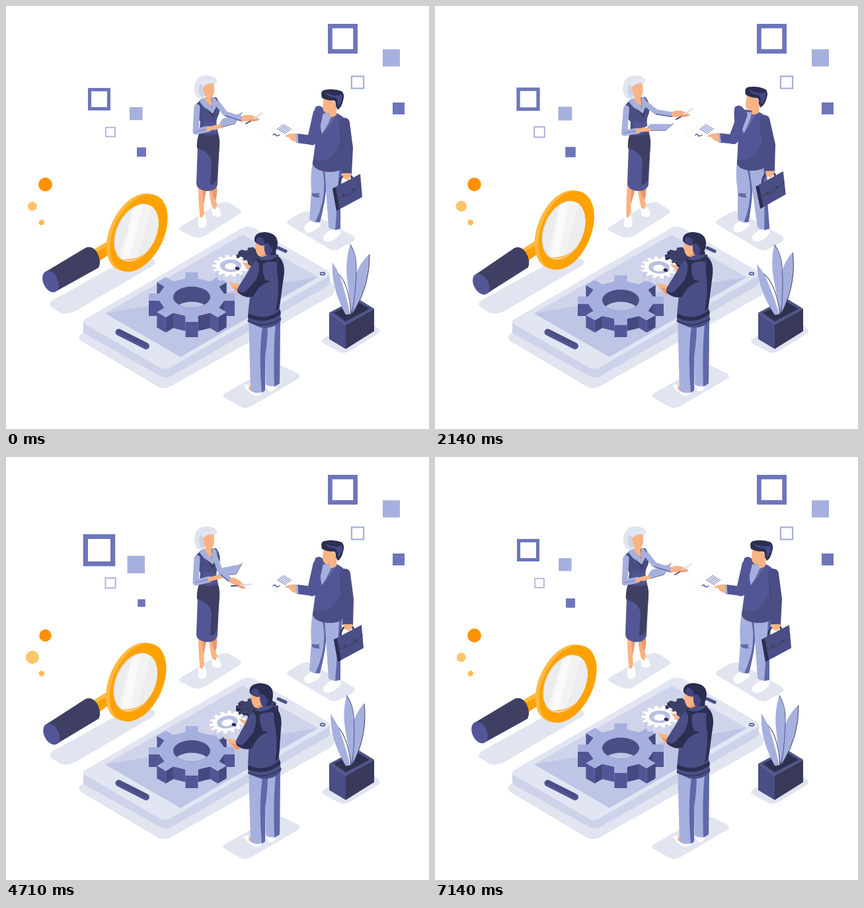
Animation of 640 by 640 pixels, one loop 7.21 s. Source, as an HTML page:

```html
<!DOCTYPE html>
<html lang="en">
<head>
<meta charset="utf-8">
<title>Isometric team</title>
<style>
html, body { margin: 0; height: 100%; overflow: hidden; background: #fff; }
svg { display: block; width: 100%; height: 100%; }
</style>
</head>
<body>
<svg viewBox="0 0 640 640"><g id="base"></g><g id="live"></g></svg>
<script>
const LOOP = 7210, STEP = LOOP / 101;
const NAVY = '#3e3f62', BLUE = '#525696', MID = '#4a4e85', LIGHT = '#a6b0de', SHADE = '#5f68a8',
  INK = '#2b2e50', SKIN = '#f9b384', SKIN2 = '#e9996c', SHADOW = '#e1e5f0', VIOLET = '#6d76ba',
  SCREEN = '#bec5e5';
let now = 0;

// SVG helpers
const shape = (fill, d, more = '') => `<path fill="${fill}" d="${d}" ${more}/>`;
const poly = (fill, points, more) => shape(fill, `M${points}Z`, more);
const line = (color, width, d, cap = 'round') =>
  `<path fill="none" stroke="${color}" stroke-width="${width}" stroke-linejoin="round" stroke-linecap="${cap}" d="${d}"/>`;
const oval = (fill, x, y, rx, ry, turn = 0) =>
  `<ellipse fill="${fill}" cx="${x}" cy="${y}" rx="${rx}" ry="${ry}" transform="rotate(${turn} ${x} ${y})"/>`;
const group = (transform, ...parts) => `<g transform="${transform}">${parts.join('')}</g>`;
const clipped = (id, outline, ...parts) =>
  `<clipPath id="${id}">${outline}</clipPath><g clip-path="url(#${id})">${parts.join('')}</g>`;

// Eased, looping interpolation between values at given times
function track(times, values) {
  let i = times.length - 1;
  while (times[i] > now) i--;
  const end = times[i + 1] ?? LOOP, next = values[(i + 1) % values.length];
  const u = Math.min(1, (now - times[i]) / (end - times[i]));
  return values[i] + (next - values[i]) * u * u * (3 - 2 * u);
}
const POSES = [0, 1430, 2860, 3930, 4710, 5570];
const key = (...values) => track([...POSES, 7140], [...values, values[0]]);
const morph = (...poses) => {
  const rows = poses.map(p => p.split(' ').map(Number));
  return rows[0].map((_, i) => key(...rows.map(r => r[i])).toFixed(2));
};

// Extruded cog seen from above
function cog(x, y, outer, inner, teeth, half, squash, depth, faces, top) {
  const points = [];
  for (let k = 0; k < teeth; k++) {
    const a = k * 2 * Math.PI / teeth, c = Math.cos(a), s = Math.sin(a);
    for (const [u, v] of [[inner, -half], [outer, -half], [outer, half], [inner, half]])
      points.push([x + u * c - v * s, y + (u * s + v * c) * squash]);
  }
  const sides = points.map((p, i) => [p, points[(i + 1) % points.length]])
    .filter(([p, q]) => q[0] < p[0] - .01)
    .sort((a, b) => a[0][1] + a[1][1] - b[0][1] - b[1][1])
    .map(([p, q]) => poly(faces[q[1] - p[1] > 1 ? 1 : 0], [p, q, [q[0], q[1] + depth], [p[0], p[1] + depth]]));
  return sides.join('') + poly(top, points);
}

function backdrop() {
  return [
    shape(SHADOW, 'M264 334L322 299Q330 295 338 298L354 308Q358 312 353 315L300 348Q291 353 282 349L264 340Q260 337 264 334Z'),
    shape(SHADOW, 'M427 324L446 313Q453 309 460 312L524 347Q531 352 524 357L503 368Q497 371 490 368L428 331Q423 328 427 324Z'),
    shape(SHADOW, 'M69 446L192 378Q212 379 224 384Q228 389 222 393L106 461Q92 468 82 464L68 455Q64 451 69 446Z'),
    shape(SHADOW, 'M112 498L130 480L480 400L497 425Q498 436 490 440L250 575Q240 581 230 576L114 507Q108 502 112 498Z'),
    shape(SHADOW, 'M331 586L402 546Q410 541 419 545L442 556Q448 560 442 564L372 605Q363 611 354 606L331 593Q326 590 331 586Z'),
    shape(SHADOW, 'M481 503L530 474Q540 469 548 474L563 488Q568 493 561 497L520 522Q512 527 504 523L481 511Q475 507 481 503Z'),
    // phone
    shape('#cfd3ea', 'M117 478V492Q117 495 121 497L232 559Q241 565 250 560L486 424Q490 421 490 417V404Z'),
    shape('#e2e6f3', 'M121 473L357 336Q366 331 376 336L486 400Q494 405 486 410L250 546Q241 552 231 546L121 482Q113 477 121 473Z'),
    poly('#d0d4eb', '150 465 358 346 472 410 264 531'),
    poly(SCREEN, '150 465 472 410 264 531'),
    line(BLUE, 10, 'M170.500 493.500L212 514.500'), line(MID, 6, 'M171 492L211 512'),
    line(MID, 5, 'M412 366L423 371'),
    `<ellipse cx="479" cy="405" rx="3.6" ry="2" fill="#c5cbe6" stroke="${MID}" stroke-width="1.3"/>`
  ].join('');
}

// The large cog rises from the screen and sinks back
function machinery() {
  const depth = key(23, 16, 21, 23, 19, 16), y = 463.5 - depth;
  return cog(281, y, 65, 49, 8, 9.5, .577, depth, [BLUE, '#454980'], LIGHT)
    + oval(MID, 281, y, 28, 16)
    + clipped('hole', `<ellipse cx="281" cy="${y}" rx="28" ry="16"/>`, oval(SCREEN, 281, y + depth, 28, 16))
    + cog(380, 378, 32, 25, 10, 4.5, .42, 5, [INK, INK], '#3c4068');
}

// Decorations
const bump = (center, half) => {
  const d = Math.abs(now % (LOOP / 3) - center) / half;
  return d < 1 ? Math.cos(d * Math.PI / 2) ** 2 : 0;
};
const pulse = (size, gain, center) => size + gain * (bump(center, 400) - .28 * bump(center + 500, 250));
const box = (x, y, size, color) =>
  `<rect x="${x - size / 2}" y="${y - size / 2}" width="${size}" height="${size}" fill="${color}"/>`;
const frame = (x, y, size, color, weight) =>
  box(x, y, size, color) + box(x, y, size * (1 - 2 * weight), '#fff');

const decorations = () => [
  frame(509.5, 49.5, pulse(45, 20, 1110), VIOLET, .15),
  box(583, 78.5, pulse(26, 11, 950), LIGHT),
  frame(532, 115.5, pulse(20.5, 9.5, 680), LIGHT, .11),
  box(594, 155, pulse(18, 9, 600), VIOLET),
  frame(141, 141, key(34, 37, 33.5, 33, 48.5, 30.5), VIOLET, .15),
  box(196.8, 162.8, key(19.5, 25, 16.5, 20, 26.5, 16), LIGHT),
  frame(158, 190.7, key(15.5, 22, 13, 21, 17, 13.5), LIGHT, .11),
  box(205, 221, key(14, 18, 13, 19, 11.5, 14), VIOLET),
  ...[['#ff9100', 59.5, 270, key(10.4, 10, 10.4, 14.6, 9.2, 10.2)],
    ['#ffc56b', 39.8, 303, key(7, 10, 6.5, 7.2, 10, 5.8)],
    ['#ffb84d', 53.8, 327.6, key(4.2, 4.2, 4, 4.2, 4.2, 5.8)]].map(([c, x, y, r]) => oval(c, x, y, r, r))
].join('');

function magnifier() {
  const turn = track([0, 550, 1430, 1900, 2860, 3930, 4710, 5570, 6400, 7140],
    [0, 4.8, -4.6, -5, 4.8, -3.6, -2, 4.8, -4.8, 0]);
  return group(`rotate(${turn} 132 382)`,
    poly('#ffb93f', '133 368 157 354 160 362 138 376'),
    poly('#ffa200', '135 373 159 360 165 370 141 386'),
    shape(NAVY, 'M60 402L121 365.500Q131 362 138 373Q145 387 140 396L75 432Z'),
    oval(BLUE, 67.5, 417, 11, 17, -25),
    oval('#ffb93f', 195.5, 342, 37.8, 62.5, 26),
    oval('#ffa200', 201, 343.5, 37.8, 62.5, 26),
    oval('#d9dbe0', 197, 343, 30, 46.5, 26),
    clipped('lens', '<ellipse cx="198" cy="343" rx="29" ry="45.5" transform="rotate(26 198 343)"/>',
      box(198, 343, 120, '#f3f3f3'), poly('#ebecee', '152 330 182 295 196 295 166 395 152 395'),
      poly('#fafafa', '196 295 208 295 184 395 172 395'), poly('#ededef', '226 290 250 290 218 395 194 395')),
    shape('#ffb93f', 'M176 383Q195 391 214 371Q199 385 176 383Z'));
}

function woman() {
  const shift = key(0, 3, 3, 0, 0, 0), lean = key(0, -5, -1, 0, 0, 3.5);
  const arm = morph('318 145 332 163 357 171', '317 146 340 154 368 151', '317 147 329 167 350 178',
    '315 148 325 175 339 186', '315 148 325 175 339 186', '320 150 330 173 347 183');
  const sleeve = morph('289 153 287 190 306 186', '290 155 285 192 304 190', '289 155 288 192 309 188',
    '289 153 287 190 308 185', '289 153 287 190 308 185', '290 154 307 188 317 177');
  const tablet = morph('317 186 346 178 357 161 327 170', '312 190 348 191 359 183 322 181',
    '318 187 350 185 361 173 330 174', '319 180 348 177 357 161 327 167',
    '319 180 348 177 357 161 327 167', '327 170 348 153 351 132 329 156');
  return [
    group(`rotate(${key(0, 7, 3, 0, 0, 0)} 298 272)`,
      shape(SKIN, 'M291 270H304L299 300Q300 315 301 322L294 322Q291 300 291 270Z'),
      shape(SKIN2, 'M298 274H304L299 300Q297 288 298 274Z'),
      shape('#fff', 'M292 317Q296 325 300 314Q305 325 303 333Q297 338 291 334Q290 325 292 317Z')),
    shape(SKIN, 'M307 270H319Q320 285 317 294L323 309L316 313Q308 300 307 270Z'),
    shape(SKIN2, 'M310 274H319Q320 285 317 294Q312 288 310 274Z'),
    shape('#fff', 'M311 303Q317 312 319 302Q326 309 326 317Q320 321 312 317Z'),
    group(`translate(${shift} 0)`,
      shape(BLUE, 'M290 212L288 268Q288 278 304 280Q318 280 320 270L323 205Q306 198 290 212Z'),
      shape(NAVY, 'M293 190Q306 196 320 190Q324 200 323 212L319 262Q315 272 309 270L311 235Q308 220 289 215Q288 202 293 190Z'),
      group(`rotate(${lean} 306 192)`,
        shape(MID, 'M285 152Q294 139 306 139L318 138Q327 150 322 164Q317 172 319 182L321 193Q306 199 292 193L294 175Q286 165 285 152Z'),
        shape(BLUE, 'M300 172Q310 180 317 174L320 190Q308 196 296 190Z'),
        shape(LIGHT, 'M292 143Q300 136 304 142L312 154L312 137Q321 140 319 150L313 164Q300 156 292 143Z'),
        shape(NAVY, 'M301 153L313 163L317 155L314 170Z'),
        shape(SKIN, 'M300 138L311 137L312 152Q303 147 300 138Z'),
        shape('#e0e4ef', 'M285 123Q287 104 304 105Q320 106 319 115L300 138Q290 143 287 134Q284 128 285 123Z'),
        shape(SKIN, 'M298 123Q304 116 314 117Q317 128 313 136Q308 142 303 138Q297 130 298 123Z'),
        shape('#ccd2e3', 'M292 130Q290 114 306 110Q313 109 318 114Q312 113 309 118Q300 117 297 124Q302 130 299 138Q294 138 292 130Z'),
        shape('#e4e7f0', 'M294 117Q301 108 318 111L316 117Q305 115 298 122Z'))),
    line(LIGHT, 9, 'M' + sleeve), line('#8b95cb', 2, `M${sleeve[2]} ${sleeve[3]}L${sleeve[4]} ${sleeve[5]}`),
    line(SKIN, 6, `M${sleeve[4]} ${sleeve[5]}l12 -3`),
    poly('#fff', tablet, 'stroke="#eef0f7" stroke-width="2"'),
    poly(LIGHT, tablet, 'stroke="#fff" stroke-width="1.5"'),
    line(MID, 1, `M${tablet.slice(0, 2)}L${tablet.slice(2, 4)}L${tablet.slice(4, 6)}`),
    line(SKIN, 5, `M${+sleeve[4] + 9} ${sleeve[5] - 2}l9 ${key(-2, 2, -1, -2, -2, -12)}`),
    line(LIGHT, 8, 'M' + arm, 'butt'), line(SHADE, 1.5, `M${arm[2]} ${+arm[3] + 3}L${arm[4]} ${+arm[5] + 3}`),
    group(`translate(${arm.slice(4)}) rotate(${key(0, -8, 8, 28, 28, 12)})`,
      shape(SKIN, 'M-1 -4Q8 -8 17 -5L27 0Q24 4 14 3Q5 4 -1 3Z'),
      line('#d5d9ea', 2, 'M14 2L31 -9'), line(MID, 2, 'M6 7L15 2'), shape(SKIN2, 'M12 0L26 1Q20 4 13 3Z'))
  ].join('');
}

function visitor() {
  const hip = key(0, -7, -7, -3, 0, 0), slant = -hip / 95;
  const arm = morph('472 163 463 203 440 200', '465 162 456 201 438 202', '465 167 447 202 422 197',
    '470 163 461 202 438 197', '472 163 463 203 440 200', '472 163 463 203 440 200');
  const right = morph('512 177 517 215 515 254', '500 175 503 213 494 252', '497 171 511 207 518 249',
    '510 177 513 215 508 253', '513 177 518 215 517 254', '512 177 517 215 515 254');
  const lines = [0, 1, 2, 3, 4].map(i => line('#8c95c6', 1.3, `M${-21 - 2.2 * i} ${-21 + 1.6 * i}l13 8`, 'butt'));
  return [
    shape('#fff', 'M452 333Q460 322 472 326L477 330Q470 340 458 343Q449 341 452 333Z'),
    shape('#fff', 'M480 349Q490 334 505 338L507 343Q500 354 488 357Q478 356 480 349Z'),
    group(`matrix(1 0 ${slant} 1 ${-slant * 335} 0)`,
      shape(LIGHT, 'M464 236L488 240L482 295L475 327Q466 329 459 323L462 280Q460 258 464 236Z'),
      shape(SHADE, 'M478 244L487 248Q485 290 475 327L468 327Q488 285 478 244Z'),
      shape(LIGHT, 'M482 242L509 240L506 290V337Q496 341 488 335L485 290Z'),
      shape(SHADE, 'M504 246L509 240L506 290V337L498 339Q502 290 504 246Z'),
      shape(SHADE, 'M463 283Q469 284 475 283Q471 287 476 289Q468 291 463 287Z')),
    group(`translate(${key(0, -6, -7, -2, 0, 0)} ${key(0, -2, -2, 0, 0, 0)}) rotate(${key(0, -3, -7, 0, 0, 0)} 487 245)`,
      shape(BLUE, 'M468 153Q476 147 482 158L498 161Q516 168 519 184L511 238Q512 251 488 251Q466 249 464 238L469 200Q463 170 468 153Z'),
      shape(MID, 'M465 232Q490 240 502 212L514 200L511 238Q512 251 488 251Q466 249 464 238Z'),
      shape(LIGHT, 'M476 163Q486 161 498 164Q490 178 478 194Q474 180 476 163Z'),
      shape(SHADE, 'M493 163L499 164Q492 180 478 194Q490 176 493 163Z'),
      group(`translate(${key(0, 8, 0, 0, 0, 0)} ${key(0, -3, 0, 0, 0, 0)}) rotate(${key(0, 14, 4, 0, 0, 0)} 492 162)`,
        shape(SKIN, 'M481 139Q478 150 480 158Q484 164 489 162L490 168Q495 169 500 165L501 146Z'),
        shape(INK, 'M478 139Q475 128 482 127Q496 124 508 129Q513 134 510 143Q508 153 502 157L499 151Q500 142 494 143Q485 143 478 139Z'),
        shape('#434989', 'M483 131Q486 138 497 138Q503 140 502 153Q511 143 508 133Q501 139 483 131Z'))),
    line(MID, 16, 'M' + right, 'butt'), oval(MID, right[0], right[1], 8, 8),
    line(NAVY, 1, `M${right[0] - 7} ${+right[1] + 12}L${right[2] - 8} ${right[3]}`),
    group(`translate(${right[4]} ${+right[5] + 3}) rotate(${key(0, 7, -10, 4, 0, 0)})`,
      line(NAVY, 3, 'M-11 16Q-11 -1 2 -2Q10 -1 9 8'),
      shape(SKIN, 'M-6 -4L7 -4Q8 4 1 6L-5 3Z'),
      poly(MID, '-21 19 21 -3 24 32 -15 53'), poly(INK, '-21 19 -16 18 -10 50 -15 53'),
      line(NAVY, 1.2, 'M-18 35Q10 30 22 12'), line(NAVY, 4, 'M-4 27v4M11 19v4', 'butt')),
    line(BLUE, 15, 'M' + arm.slice(0, 4)), line(BLUE, 14, `M${arm.slice(2, 4)}L${arm.slice(4)}`, 'butt'),
    oval(BLUE, arm[2], arm[3], 7.4, 7.4),
    group(`translate(${arm.slice(4)}) rotate(${key(0, -10, 7, 0, 0, 0)})`,
      poly('#fff', '-51 -6 -26 -23 0 -11 -28 6', 'stroke="#eef0f7" stroke-width=".8"'),
      ...lines, line(MID, 1.4, 'M-36 -5q3 -3 4 0t6 0'),
      shape(SKIN, 'M1 -7Q-7 -8 -16 -5L-18 -2Q-12 -3 -10 1Q-6 6 1 6Z'),
      line(LIGHT, 3, 'M0 -7L1 7', 'butt'))
  ].join('');
}

function plant() {
  const leaf = (turn, ...parts) => group(`rotate(${turn} 520 466)`, ...parts);
  return [
    poly('#4f5389', '489 464 531 442 557 458 514 482'),
    poly('#2e304e', '496 464 531 447 550 458 514 477'),
    leaf(key(0, -5, -6, -2, -5, -2),
      shape(LIGHT, 'M550 375Q527 396 525 430L525 464Q551 422 550 375Z'),
      line(NAVY, 1, 'M550 376Q551 422 526 463')),
    leaf(key(0, -3, -5, -5, -3, -5),
      shape('#fff', 'M502 404Q519 420 522 466L516 467Q502 430 502 404Z', `stroke="${NAVY}" stroke-width="1"`),
      shape(LIGHT, 'M521 360Q513 385 516 412Q519 440 523 466Q531 420 529 388Q527 372 521 360Z'),
      line(SHADE, 1.3, 'M521 361Q530 375 530 395Q530 430 524 464')),
    leaf(key(0, -2, -8, -6, -2, -6),
      shape(LIGHT, 'M494 388Q491 425 514 467L521 466Q514 435 505 408Q500 397 494 388Z')),
    poly(MID, '489 464 514 482 514 519 489 504'),
    poly('#38395a', '514 482 557 458 557 492 514 519')
  ].join('');
}

function operator() {
  const [x, y] = morph('340 393', '333 400', '345 391', '339 394', '335 401', '339 391');
  const hand = morph('337 418', '334 426', '336 413', '337 418', '334 426', '336 415');
  return [
    group(`translate(${x} ${y}) rotate(${key(0, -10, 17, 0, -10, 0)})`,
      cog(0, 0, 27.5, 22, 14, 2.8, .6, 9, ['#d3d7eb', '#c6cce6'], '#fff'),
      oval('#b9c1e2', 0, 0, 16, 9.5), oval('#fff', 0, 1, 9, 5)),
    shape('#fff', 'M360 574Q364 570 370 576L388 582Q388 589 378 590Q364 584 360 574Z'),
    shape('#fff', 'M392 572L409 574Q408 583 398 583Z'),
    shape(SKIN, 'M368 573L374 584L367 580Z'),
    shape(LIGHT, 'M390 470L415 470L414 571Q405 579 393 573Z'),
    shape(SHADE, 'M408 480L415 474L414 571L406 576Q404 520 408 480Z'),
    shape(LIGHT, 'M367 468L396 474Q396 505 392 530V582Q380 589 370 582Z'),
    shape(SHADE, 'M388 484L396 482Q396 505 392 530V582L387 585Q382 530 388 484Z'),
    group(`translate(${hand})`,
      shape(SKIN, 'M0 -1L9 2Q15 1 19 6L22 14L15 18Q7 12 0 -1Z'), shape(SKIN2, 'M6 7L16 9L20 15L15 17Z')),
    group(`translate(${x} ${y})`, shape(SKIN, 'M17 -5Q23 -5 30 0L36 2L34 10Q24 4 17 -5Z'),
      oval(INK, 10, 4, 3.5, 2.5, 20)),
    group(`rotate(${key(0, -1.5, .6, -1.2, -3.6, 1.8)} 391 470)`,
      shape(SKIN, 'M378 357Q376 372 382 378Q388 381 396 381L397 360Z'),
      shape(SKIN2, 'M384 378Q392 376 394 370L396 382Z'),
      shape(INK, 'M376 356Q374 343 391 342Q410 343 411 358Q411 370 404 378L394 377Q390 370 391 362Q384 364 376 356Z'),
      shape('#414681', 'M378 356Q380 347 386 350Q402 352 404 364L400 377L394 377Q390 370 391 362Q384 364 378 356Z'),
      shape(INK, 'M383 348Q402 344 405 360L402 368Q398 356 391 360Q392 352 383 348Z'),
      shape(MID, 'M384 382Q396 374 411 378Q423 386 420 410Q416 430 414 455L416 476Q405 490 384 486L366 478Q366 462 369 441Q362 441 354 436Q348 432 351 426L366 402Q372 388 384 382Z'),
      shape(INK, 'M411 378Q424 388 420 410L415 448Q413 460 408 462Q415 430 410 400Z'),
      shape(INK, 'M351 430Q358 438 366 428L378 415Q384 402 383 390L389 388Q387 402 392 414L401 417Q384 419 374 440L365 440Q358 440 351 433Z'),
      shape(INK, 'M379 381Q394 390 411 378L410 388Q398 384 386 392Q380 390 379 381Z'),
      shape(INK, 'M367 465Q392 478 415 460L416 466Q392 484 366 471Z'),
      line(INK, 1.2, 'M366 476Q390 490 416 473'))
  ].join('');
}

const base = document.getElementById('base'), live = document.getElementById('live');
base.innerHTML = backdrop();
let shown = -1;
function render(time) {
  const step = Math.floor((time % LOOP) / STEP + .1) % 101;
  if (step !== shown) {
    shown = step;
    now = step * STEP;
    live.innerHTML = [machinery, decorations, magnifier, woman, visitor, plant, operator].map(draw => draw()).join('');
  }
}
const start = performance.now();
function tick() {
  render(performance.now() - start);
  requestAnimationFrame(tick);
}
tick();
</script>
</body>
</html>
```
